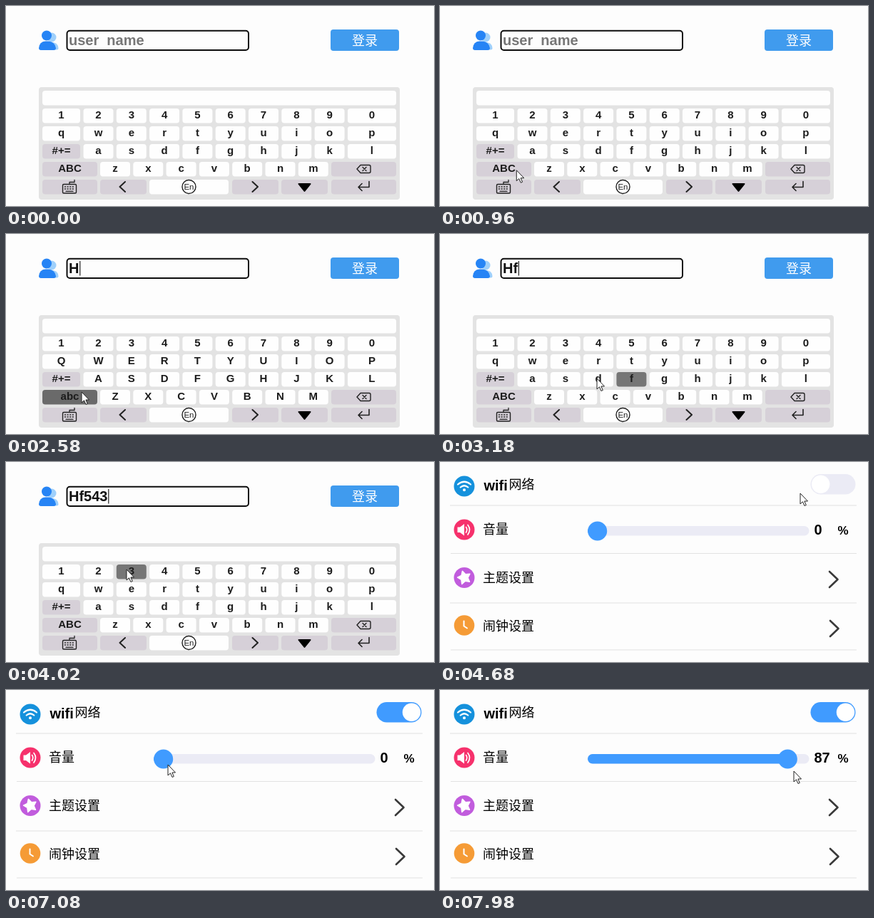
Recreate the animation shown at these times as an HTML page. Size 600 px wide and 281 px high, loop 8000 ms.

```html
<!DOCTYPE html>
<html lang="zh">
<head>
<meta charset="utf-8">
<title>Login and settings panel</title>
<style>
html, body { margin: 0; width: 100%; height: 100%; overflow: hidden; background: #fdfdfd; }
svg { display: block; width: 100%; height: 100%; }
text { white-space: pre; font-family: "Liberation Sans", Arial, sans-serif; }
.key { font-size: 15px; font-weight: bold; text-anchor: middle; fill: #1c1c1c; }
.bold { font-size: 20px; font-weight: bold; }
.cjk { font-family: "Noto Sans CJK SC", "Noto Sans CJK", sans-serif; font-size: 18px; font-weight: 300; }
.line { fill: none; stroke: #222; stroke-width: 2; stroke-linecap: round; stroke-linejoin: round; }
</style>
</head>
<body>
<svg id="stage" viewBox="0 0 600 281">
  <rect width="600" height="281" fill="#fdfdfd"/>

  <g id="login">
    <circle cx="64" cy="44" r="6.5" fill="#9fd0fb"/>
    <path d="M58 61.500V55Q60 50 66 51Q73.500 53 73.500 59Q73.500 61.500 71 61.500Z" fill="#9fd0fb"/>
    <circle cx="57" cy="41.500" r="7" fill="#2684f5"/>
    <path d="M46 59Q47 50 55 49.500H60Q68.500 50.500 70 59Q70 62 67 62H49Q46 62 46 59Z" fill="#2684f5"/>
    <rect x="85.500" y="34.700" width="254.500" height="27.300" rx="4" fill="#fdfdfd" stroke="#0c0c0c" stroke-width="2"/>
    <text id="entry" class="bold" x="88" y="55"></text>
    <path id="caret" d="M0 38V58.500" stroke="#222" stroke-width="1.200"/>
    <rect x="455" y="33" width="96" height="30" rx="4" fill="#409bee"/>
    <text class="cjk" x="485" y="54.500" fill="#fff">登录</text>
    <rect x="46" y="114" width="506" height="158" rx="4" fill="#e3e3e3"/>
    <rect x="51" y="119" width="496" height="20.500" rx="4" fill="#fefefe"/>
    <g id="keys"></g>
    <g class="line">
      <path d="M89 250V247.500H96V244.500" stroke-width="1.300"/>
      <rect x="79.500" y="250.500" width="19" height="12.500" rx="1.500" stroke-width="1.400"/>
      <path d="M82.500 254H96M82.500 257H96" stroke-width="1.500" stroke-dasharray="1 2.600"/>
      <path d="M84 260.300H94" stroke-width="1.300"/>
      <path d="M167 247L159.500 254L167 261M345.500 247L353 254L345.500 261"/>
      <path d="M410.500 250H426.500L418.500 260Z" fill="#000" stroke="#000"/>
      <path d="M509 246.500V254.500H494M499 249.500L494 254.500L499 259.500" stroke-width="1.600"/>
      <path d="M497 223.500H509Q511 223.500 511 225.500V232.500Q511 234.500 509 234.500H497L492 229Z" stroke-width="1.400"/>
      <path d="M500 226.500L505 231.500M505 226.500L500 231.500" stroke-width="1.400"/>
      <circle cx="256.500" cy="254" r="9.500" stroke-width="1.400"/>
    </g>
    <text x="256.500" y="258" text-anchor="middle" font-size="11.500" fill="#222">En</text>
  </g>

  <g id="settings">
    <path d="M14 61H584M15 128.500H584M14 198H584M15 264H584" stroke="#e2e2e2" stroke-width="1.200"/>
    <circle cx="34" cy="34" r="14.500" fill="#1591dc"/>
    <g fill="none" stroke="#fff" stroke-width="2.200" stroke-linecap="round">
      <path d="M25 31.500Q34 24 43 31.500M28.700 35.500Q34 31 39.300 35.500"/>
    </g>
    <circle cx="34" cy="39.200" r="2" fill="#fff"/>
    <circle cx="34" cy="95" r="14.500" fill="#f6316c"/>
    <path d="M24.500 91.500H28L34 87V103.500L28 99H24.500Z" fill="#fff"/>
    <path d="M36.500 91.500Q39 95 36.500 99M39 88.500Q44 95 39 102" fill="none" stroke="#fff" stroke-width="1.700" stroke-linecap="round"/>
    <circle cx="34" cy="162.500" r="14.500" fill="#c15cdd"/>
    <path id="star" fill="#fff" stroke="#fff" stroke-width="1.500" stroke-linejoin="round"/>
    <circle cx="34" cy="229.500" r="14.300" fill="#f59b36"/>
    <path d="M33.500 223.500V230.500L38 233.500" fill="none" stroke="#fff" stroke-width="2" stroke-linecap="round"/>
    <text class="bold" x="61.500" y="39.500" font-size="21">wifi</text>
    <text class="cjk" x="96.500" y="38">网络</text>
    <text class="cjk" x="60" y="100.500">音量</text>
    <text class="cjk" x="60" y="168.500">主题设置</text>
    <text class="cjk" x="60" y="236.500">闹钟设置</text>
    <path class="line" d="M546 154L557.500 165L546 176M547 223L558.500 234L547 245" style="stroke:#3a3a3a;stroke-width:2.600"/>
    <rect id="track" x="519.500" y="17" width="63" height="28.500" rx="14.250"/>
    <circle id="knob" cy="31.300" r="12.700" fill="#fff"/>
    <rect x="207" y="90" width="310.500" height="13.500" rx="6.750" fill="#ebebf5"/>
    <rect id="fill" x="207" y="90" height="13.500" rx="6.750" fill="#409bff"/>
    <circle id="handle" cy="97" r="13.500" fill="#409bff"/>
    <text id="volume" class="bold" x="524.500" y="102"></text>
    <text x="557.500" y="102" font-size="17" font-weight="bold">%</text>
  </g>

  <path id="pointer" d="M0 0V15L3.500 11.800L6 17.500L8.300 16.500L5.900 11H10.500Z" fill="#fff" stroke="#222" stroke-width="1"/>
</svg>

<script>
const LOOP = 8000, STEP = 60;
const PLACEHOLDER = "user  name";
const $ = id => document.getElementById(id);
const set = (el, attrs) => { for (const k in attrs) el.setAttribute(k, attrs[k]); };
const show = (el, on) => { el.style.display = on ? "" : "none"; };

function add(tag, attrs, parent) {
  const el = document.createElementNS("http://www.w3.org/2000/svg", tag);
  set(el, attrs);
  parent.appendChild(el);
  return el;
}

// Keyboard layout
const PITCH = 46.3, SPECIAL = "#d6d0d8", PLAIN = "#fefefe";
const keys = {};

function addKey(name, left, right, row, color = PLAIN, label = name) {
  const y = 144 + row * 25;
  const rect = add("rect", { x: left, y, width: right - left, height: 20.5, rx: 4 }, $("keys"));
  const text = add("text", { class: "key", x: (left + right) / 2, y: y + 14.3 }, $("keys"));
  text.textContent = label;
  keys[name] = { rect, text, color, label };
}

["1234567890", "qwertyuiop", " asdfghjkl"].forEach((chars, row) => {
  [...chars].forEach((c, i) => {
    if (c === " ") return;
    const left = i ? 108.5 + (i - 1) * PITCH : 51;
    addKey(c, left, i === 9 ? 547 : i ? left + 42 : 104, row);
  });
});
[..."zxcvbnm"].forEach((c, i) => addKey(c, 132 + i * PITCH, 174 + i * PITCH, 3));
addKey("symbols", 51, 104, 2, SPECIAL, "#+=");
addKey("shift", 51, 128, 3, SPECIAL, "abc");
addKey("delete", 456, 547, 3, SPECIAL, "");
[[51, 128], [132, 197], [201, 312], [317, 382], [386, 451], [456, 547]].forEach(([a, b], i) =>
  addKey("bottom" + i, a, b, 4, i === 2 ? PLAIN : SPECIAL, ""));

const starPoints = Array.from({ length: 10 }, (_, i) => {
  const a = -1.85 + i * Math.PI / 5, r = i % 2 ? 5 : 9.5;
  return `${34 + r * Math.cos(a)} ${162.5 + r * Math.sin(a)}`;
});
$("star").setAttribute("d", `M${starPoints.join("L")}Z`);

// Pointer stops: time, x, y
const PATH = [
  [540, 130, 278], [1020, 104, 224], [1320, 104, 224], [1500, 167, 211],
  [1860, 357, 204], [2100, 357, 204], [2460, 106, 222], [2760, 106, 222],
  [3060, 220, 203], [3240, 220, 203], [3400, 266, 155], [3520, 266, 155],
  [3640, 219, 154], [3760, 219, 154], [3900, 169, 151], [4080, 169, 151],
  [4440, 505, 44], [5040, 505, 44], [5340, 518, 58], [5700, 535, 35],
  [5880, 535, 35], [6120, 545, 42], [6480, 545, 42], [6780, 390, 130],
  [7080, 227, 105], [7320, 227, 105], [7980, 496, 114]
];
// Key presses: name, start, end, typed character
const PRESSES = [
  ["shift", 1080, 1260], ["h", 1920, 2040, "H"], ["shift", 2520, 2640],
  ["f", 3120, 3240, "f"], ["5", 3420, 3540, "5"], ["4", 3660, 3780, "4"],
  ["3", 3960, 4080, "3"]
];
const LOGIN_AT = 4680, WIFI_AT = 6480;

function pointerAt(t) {
  const i = PATH.findIndex(p => p[0] > t);
  if (i < 0) return PATH[PATH.length - 1].slice(1);
  if (!i) return PATH[0].slice(1);
  const [t0, x0, y0] = PATH[i - 1], [t1, x1, y1] = PATH[i];
  const u = (t - t0) / (t1 - t0);
  return [x0 + (x1 - x0) * u, y0 + (y1 - y0) * u];
}

function drawLogin(t) {
  const upper = t >= 1260 && t < 2640;
  const down = PRESSES.find(p => t >= p[1] && t < p[2]);
  for (const name in keys) {
    const key = keys[name];
    const pressed = down && down[0] === name;
    key.rect.setAttribute("fill", pressed ? (name === "shift" ? "#6a6a6a" : "#767676") : key.color);
    if (name === "shift") key.text.textContent = upper ? "abc" : "ABC";
    else key.text.textContent = upper ? key.label.toUpperCase() : key.label;
  }
  const typed = PRESSES.filter(p => p[3] && t >= p[1]).map(p => p[3]).join("");
  const entry = $("entry");
  entry.textContent = typed || PLACEHOLDER;
  entry.setAttribute("fill", typed ? "#111" : "#777");
  show($("caret"), typed);
  if (typed) $("caret").setAttribute("transform", `translate(${89.3 + entry.getComputedTextLength()} 0)`);
}

function drawSettings(t, x) {
  const on = t >= WIFI_AT;
  $("track").setAttribute("fill", on ? "#409bff" : "#ebebf5");
  $("knob").setAttribute("cx", on ? 568.5 : 533.7);
  const value = t < 7320 ? 0 : Math.round((x - 227) / 269 * 87);
  const center = 220.7 + value * 3.065;
  $("handle").setAttribute("cx", center);
  $("fill").setAttribute("width", center - 207);
  $("volume").textContent = value;
}

function draw(t) {
  const [x, y] = pointerAt(t);
  const loggedIn = t >= LOGIN_AT;
  show($("login"), !loggedIn);
  show($("settings"), loggedIn);
  if (loggedIn) drawSettings(t, x);
  else drawLogin(t);
  show($("pointer"), t >= PATH[0][0]);
  $("pointer").setAttribute("transform", `translate(${x} ${y})`);
}

const start = performance.now();
function tick() {
  const t = (performance.now() - start) % LOOP;
  draw(Math.floor(t / STEP) * STEP);
  requestAnimationFrame(tick);
}
tick();
</script>
</body>
</html>
```
